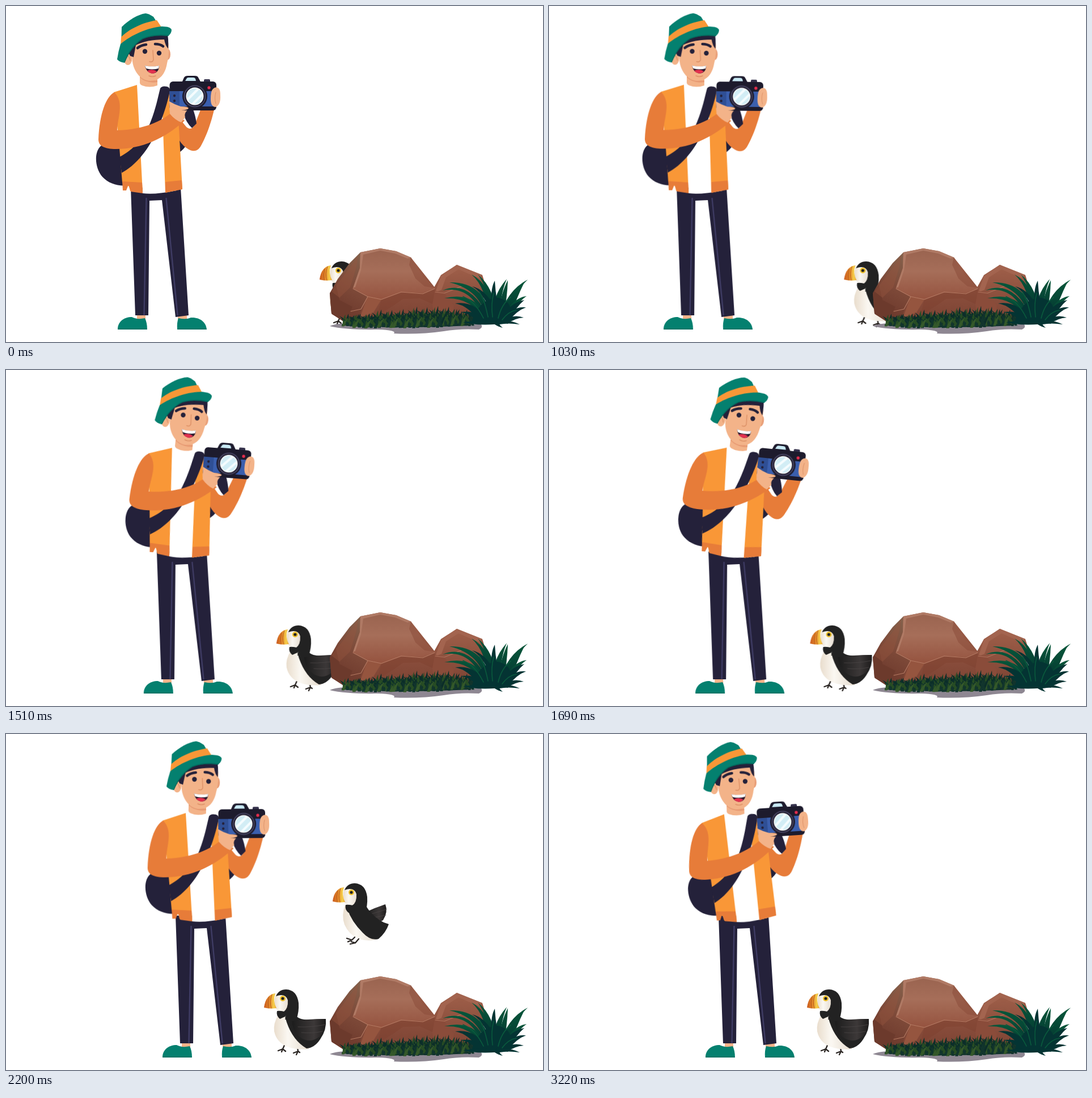
These frames come from a looping animation (947 by 592 pixels, 3720 ms). An HTML page without scripts:

```html
<!DOCTYPE html>
<html lang="en">
<head>
<meta charset="utf-8">
<title>Bird photographer</title>
<style>
html,body{margin:0;width:100%;height:100%;overflow:hidden;background:#fff}
svg{display:block;width:100vw;height:100vh}
.man,.torso,.head,.walker,.flyer{animation:3720ms infinite linear}
.man{animation-name:walk}
.torso{animation-name:lean;transform-origin:262px 328px}
.head{animation-name:nod;transform-origin:255px 132px}
.walker{animation-name:waddle}
.flyer{animation-name:fly}
@keyframes walk{
  0%{transform:translateX(0)}
  26.075%{transform:translateX(0);animation-timing-function:steps(31)}
  51.075%,100%{transform:translateX(79px)}
}
@keyframes lean{
  0%{transform:translateX(0) rotate(0deg)}
  26.075%{transform:translateX(0) rotate(0deg);animation-timing-function:steps(31)}
  51.075%{transform:translateX(2px) rotate(7.7deg);animation-timing-function:steps(14)}
  62.366%,100%{transform:translateX(11px) rotate(-3.7deg)}
}
@keyframes nod{
  0%{transform:rotate(0deg)}
  26.075%{transform:rotate(0deg);animation-timing-function:steps(31)}
  51.075%,100%{transform:rotate(2deg)}
}
@keyframes waddle{
  0%{transform:translateX(98px)}
  18.011%{transform:translateX(98px);animation-timing-function:steps(36)}
  47.043%,100%{transform:translateX(0)}
}
@keyframes fly{
  0%{transform:translate(62.7px,189.2px)}
  45.43%{transform:translate(62.7px,189.2px);animation-timing-function:steps(51)}
  86.559%,100%{transform:translate(-122.4px,-378.4px)}
}
.navy{fill:#24213a}
.teal{fill:#04806f}
.light{fill:#f99737}
.dark{fill:#e77c39}
.skin{fill:#f3b389}
.black{fill:#222}
.line{fill:none;stroke-linecap:round;stroke-linejoin:round}
</style>
</head>
<body>
<svg viewBox="0 0 947 592" preserveAspectRatio="none">
<defs>
  <linearGradient id="top" x1="0" y1="0" x2="0" y2="1"><stop offset="0" stop-color="#99634f"/><stop offset=".45" stop-color="#a66e59"/><stop offset="1" stop-color="#95533f"/></linearGradient>
  <linearGradient id="side" x1=".6" y1="0" x2=".3" y2="1"><stop offset="0" stop-color="#84604b"/><stop offset=".45" stop-color="#7e4a39"/><stop offset="1" stop-color="#693529"/></linearGradient>
  <linearGradient id="low" x1="0" y1="0" x2="0" y2="1"><stop offset="0" stop-color="#a0604a"/><stop offset="1" stop-color="#7a4132"/></linearGradient>
  <linearGradient id="beak"><stop offset="0" stop-color="#c9591d"/><stop offset=".5" stop-color="#e68f2c"/><stop offset=".78" stop-color="#f6d04b"/><stop offset="1" stop-color="#e8a23a"/></linearGradient>
  <linearGradient id="belly"><stop offset="0" stop-color="#e9ddcd"/><stop offset=".4" stop-color="#fbf8f2"/><stop offset="1" stop-color="#e6dccf"/></linearGradient>
  <linearGradient id="wing"><stop offset="0" stop-color="#1c1c1c"/><stop offset=".65" stop-color="#3c3838"/><stop offset="1" stop-color="#1d1b1b"/></linearGradient>
  <linearGradient id="leaf" x1="0" y1="0" x2="0" y2="1"><stop offset="0" stop-color="#07573a"/><stop offset="1" stop-color="#04302f"/></linearGradient>

  <g id="bhead">
    <path fill="url(#belly)" d="M477 458Q490 455 496 463Q501 476 494 486Q490 491 481 488Q475 485 474 478Q472 465 477 458Z"/>
    <path class="black" d="M476 462Q481 450 494 450Q513 451 516 474Q517 490 512 503L492 503Q496 494 489 490Q498 484 497 469Q493 456 476 462Z"/>
    <path class="black" d="M478 488Q488 487 498 492L492 498L483 502Q476 496 478 488Z"/>
    <path fill="url(#beak)" d="M475 457Q458 459 455 482Q465 485 477 483Q470 470 475 457Z"/>
    <path class="line" stroke="#a94b18" stroke-width=".8" d="M464 463Q461 473 463 483M469 459Q464 472 468 483"/>
    <circle cx="488" cy="466" r="5" fill="#f0c22c"/><circle cx="488" cy="466" r="2.6" fill="#222"/>
  </g>

  <path id="b1" d="M-2 0Q-3-13-10-21Q2-14 3 0Z"/>
  <path id="b2" d="M-2 0Q-2-16 3-27Q4-13 3 0Z"/>
  <path id="b3" d="M-2 0Q1-13 10-22Q6-9 3 0Z"/>
  <g id="tuft">
    <g fill="#0c2e29"><use href="#b1" x="-7"/><use href="#b3" x="1"/><use href="#b1" x="9"/><use href="#b2" x="-3"/><use href="#b3" x="10"/></g>
    <g fill="#274c24"><use href="#b2" x="-9" y="2"/><use href="#b1" x="3" y="3"/><use href="#b3" x="-6" y="4"/></g>
    <g fill="#12352d"><use href="#b2" x="7" y="4"/><use href="#b1" x="-2" y="6"/><use href="#b3" x="4" y="7"/><use href="#b1" x="11" y="6"/></g>
    <g fill="#34582a"><use href="#b3" x="-11" y="7"/></g>
  </g>
  <g id="row"><use href="#tuft" x="0"/><use href="#tuft" x="19" y="1"/><use href="#tuft" x="39" y="-1"/><use href="#tuft" x="59"/></g>
  <clipPath id="glass"><circle cx="333" cy="159" r="14.5"/></clipPath>
</defs>

<!-- birds -->
<g class="flyer">
  <path fill="url(#wing)" d="M633 314Q650 306 668 300Q673 313 664 328Q655 334 645 330Z"/>
  <path class="line" stroke="#4b4646" stroke-width=".8" d="M640 318L670 309M645 324L669 319"/>
  <path fill="url(#belly)" d="M597 301Q590 320 596 336Q604 354 621 361Q637 366 652 362Q625 340 611 301Z"/>
  <path class="black" d="M601 299L632 296Q634 306 643 315Q657 331 674 335Q669 350 656 361Q642 365 628 350Q608 330 601 308Z"/>
  <use href="#bhead" x="120" y="-187"/>
  <path class="line" stroke="#2a2522" stroke-width="2.3" d="M614 358L609 363L600 360M609 363L602 366M621 361L615 368L606 370M615 368L608 366"/>
</g>
<g class="walker">
  <path class="line" stroke="#2a2522" stroke-width="2.3" d="M493 544L488 555L480 558M488 555L486 560M488 555L493 559M513 545L515 559L507 562M515 559L512 565M515 559L518 561"/>
  <path fill="url(#belly)" d="M480 495Q471 510 473 524Q477 543 496 551Q514 557 534 555L530 520L497 494Z"/>
  <path class="black" d="M492 498L513 498Q520 505 540 503L564 502Q566 521 554 538Q544 553 530 554Q506 540 495 508Z"/>
  <path fill="url(#wing)" d="M504 506Q532 502 564 502Q565 518 554 532Q538 546 521 536Q506 526 504 506Z"/>
  <path class="line" stroke="#4b4646" stroke-width=".8" d="M515 516Q538 517 563 512M521 526Q540 528 558 524"/>
  <use href="#bhead"/>
</g>

<!-- rocks -->
<path fill="#8e8792" d="M571 564Q584 558 620 559L838 561Q842 566 834 570Q800 568 772 573Q730 579 684 577Q690 571 655 570Q600 571 571 564Z"/>
<path fill="url(#low)" d="M752 501L767 474L795 456L840 474L848 500L822 560H750Z"/>
<path fill="#a3644f" d="M767 476L795 456L840 474L833 479L798 464L776 478L768 500L757 505Z"/>
<path fill="#8a4c3a" d="M752 501L772 505L790 528L786 560H748Z"/>
<path class="line" stroke="#b0725c" stroke-width="1.2" d="M757 504L773 506L808 492"/>
<path fill="url(#low)" d="M625 434L714 443L757 497L752 525L758 562L600 558L575 543Z"/>
<path fill="url(#side)" d="M625 434L606 453L585 481L571 506L574 542L597 557L622 548L637 512L612 497L624 462Z"/>
<path fill="#6c3a2c" d="M571 506L582 492L588 518L611 530L597 557L574 542Z"/>
<path fill="#96553f" d="M574 503L604 464L621 440L618 460L607 496L588 514Z" opacity=".4"/>
<path fill="url(#top)" d="M625 434L660 427L688 432L714 443L734 476L757 497L735 506L697 504L662 517L638 511L612 497L624 462Z"/>
<path fill="#b07a65" d="M625 434L660 427L688 432L714 443L708 445L686 436L660 431L630 438L626 466L616 495L612 497L624 462Z"/>
<path fill="#8a4b39" d="M714 443L734 476L757 497L738 494L722 480L711 456Z" opacity=".5"/>
<path fill="#95553f" d="M638 511L662 517L648 540L624 550Z"/>
<path fill="#7b3c2d" d="M662 517L697 504L735 506L757 497L752 525L730 515L700 516L680 530L655 545Z" opacity=".35"/>
<path class="line" stroke="#b57a63" stroke-width="1.1" d="M612 498L638 512L662 517L697 504L735 507L756 498M638 512L626 534L608 538"/>

<!-- grass -->
<path fill="#102f2a" d="M592 561Q620 548 660 548L740 542L815 547L818 563Q700 569 592 563Z"/>
<use href="#row" transform="translate(604 560) scale(.95 .66)"/>
<use href="#row" transform="translate(662 559) scale(1 .9)"/>
<use href="#row" transform="translate(725 557) scale(.95 1.02)"/>
<use href="#row" transform="translate(760 558) scale(.9 .86)"/>
<use href="#row" transform="translate(625 562) scale(1.1 .74)"/>
<use href="#row" transform="translate(694 561) scale(1.05 .84)"/>

<!-- bush -->
<g fill="url(#leaf)">
  <path d="M842 552Q822 492 770 501Q818 481 852 550Z"/>
  <path d="M838 554Q825 513 773 515Q828 501 850 553Z"/>
  <path d="M846 552Q838 500 782 487Q842 485 857 550Z"/>
  <path d="M850 550Q848 497 821 473Q856 491 861 550Z"/>
  <path d="M855 550Q851 497 832 473Q862 497 866 550Z"/>
  <path d="M862 550Q854 514 883 481Q869 516 873 550Z"/>
  <path d="M866 550Q873 505 885 483Q884 514 877 550Z"/>
  <path d="M870 551Q882 502 920 482Q893 508 883 553Z"/>
  <path d="M876 552Q884 509 914 487Q899 517 887 554Z"/>
  <path d="M874 555Q890 515 918 511Q898 525 886 557Z"/>
</g>
<g fill="#043433">
  <path d="M820 560Q835 514 868 514Q900 522 886 558Q850 564 820 560Z"/>
  <path d="M834 556Q816 528 792 524Q826 518 850 554Z"/>
  <path d="M832 558Q818 540 801 540Q828 533 846 557Z"/>
  <path d="M846 520Q834 500 822 494Q843 499 856 522Z"/>
  <path d="M856 520Q855 496 862 484Q863 502 866 520Z"/>
  <path d="M880 540Q894 522 914 518Q900 530 888 552Z"/>
  <path d="M878 550Q896 528 917 531Q900 537 886 556Z"/>
  <path d="M876 554Q896 542 913 549Q897 550 884 560Z"/>
  <path d="M870 555Q890 553 906 561Q886 558 870 561Z"/>
  <path d="M845 555Q823 553 806 558Q825 561 848 561Z"/>
  <path d="M860 556Q858 562 876 567Q868 561 869 554Z"/>
</g>
<g class="line" stroke="#0a5a3d" stroke-width="1.6">
  <path d="M842 550Q828 521 806 512M850 548Q844 518 835 504M858 548Q855 524 860 506M868 550Q874 525 890 513M875 553Q886 538 900 536"/>
</g>

<!-- photographer -->
<g class="man">
  <path class="skin" d="M231 541H246V552H231ZM303 541H319V552H303Z"/>
  <path class="teal" d="M197 570C197 556 208 548 222 548Q231 553 245 550Q249 558 249 570ZM302 570Q301 558 304 550Q318 553 326 549C342 548 353 557 354 570Z"/>
  <path class="line" stroke="#046d60" stroke-width="1.2" d="M198 569.4H248M303 569.4H353"/>
  <path class="navy" d="M220 320H308L322 545L299 548L275 342L253 343L251 545H228Z"/>
  <path class="line" stroke="#3f3c64" stroke-width="2.4" d="M247.500 339L243.500 544M282.500 339L302.500 544"/>

  <g class="torso">
    <path class="navy" d="M168 246C155 256 156 285 170 301C181 313 198 318 215 316V244ZM304 230L319 243Q314 253 304 259Z"/>
    <path class="dark" d="M368 178C362 207 352 232 344 246C338 257 329 258 318 250C311 245 306 238 302 230L304 196L318 213C326 220 331 214 334 206L345 178Z"/>
    <path class="navy" d="M313 180H329Q334 192 336 207L328 215Q318 206 313 190Z"/>
    <path fill="#fff" d="M231 138L240 136Q252 144 267 140L285 142L298 200L301 325Q262 333 241 330Z"/>
    <path class="light" d="M231 139L190 152L200 250L205 311L217 318L219 326L241 329ZM278 150L290 146L304 198L311 322L281 329L276 190Z"/>
    <path class="dark" d="M205 309L240 311L241 330L220 327L216 315L212 325H206ZM281 310L310 307L311 323L281 329Z"/>
    <path class="navy" d="M272 145Q275 140 284 142Q290 144 289 150C281 188 262 238 240 263C228 278 215 288 204 294L200 266C224 254 244 232 255 204C264 182 268 160 272 145Z"/>
    <path class="dark" d="M191 152C176 160 165 190 163 235C163 246 172 251 190 252C238 253 279 234 315 202L293 187C268 208 235 218 196 219C197 196 209 170 191 152Z"/>

    <g class="head">
      <path class="skin" d="M236 100V133Q235 138 240 140Q253 145 267 140V115Z"/>
      <path fill="#e79a73" d="M236 119Q247 133 267 131V134Q248 137 236 126Z"/>
      <ellipse class="skin" cx="215" cy="92" rx="7.500" ry="12"/>
      <path class="line" stroke="#dd9268" stroke-width="1.300" d="M211 87Q218 87 219 96"/>
      <ellipse cx="285" cy="85" rx="5" ry="10" fill="#e99f78"/>
      <path class="skin" d="M221 70L223 98C226 118 239 131 254 132C271 132 281 120 284 101C288 85 288 68 284 54L230 58Z"/>
      <path class="navy" d="M214 78L222 58Q258 36 284 44Q287 58 286 75Q281 70 279 59Q248 59 229 69L225 90L219 88Z"/>
      <path class="line" stroke="#24213a" stroke-width="4.600" d="M232 74Q238 69 247 68M263 67Q272 67 277 71"/>
      <circle class="navy" cx="245" cy="80" r="4.200"/><circle class="navy" cx="270" cy="83" r="4.200"/>
      <path class="line" stroke="#dd9268" stroke-width="1.500" d="M259 78L260 95Q258 100 253 98M252 123Q258 126 264 123"/>
      <path fill="#2a1a2c" d="M245 105Q258 109 270 105Q270 118 258 119Q247 117 245 105Z"/>
      <path fill="#fff" d="M245 105Q258 108 270 105L269 110Q258 113 247 110Z"/>
      <path fill="#e2314f" d="M249 114Q258 110 266 115Q262 119 258 119Q252 118 249 114Z"/>
      <path class="teal" d="M204 37C216 25 232 15 246 13Q251 13 260 19L273 40L203 73Z"/>
      <path class="light" d="M203 55C215 42 240 29 266 25L274 37C248 41 220 56 202 70Z"/>
      <path class="teal" d="M202 67C221 51 250 38 275 36Q290 36 292 42Q292 48 286 53Q262 50 241 58Q220 71 209 100Q200 99 196 94Q198 80 202 67Z"/>
      <path class="line" stroke="#03695d" stroke-width="1.500" d="M286 52Q262 49 241 57.500Q220 71 209 99"/>
    </g>

    <!-- camera -->
    <path class="skin" d="M287 163L289 190Q298 201 309 205L316 196Q313 187 325 180L318 174Z"/>
    <path fill="#1d1b2d" d="M310 135L314 126Q316 123 320 123L333 123Q338 123 339 126L344 135Z"/>
    <path fill="#c8e9f4" d="M316 132L319 127Q320 126 322 126H330Q333 126 334 128L335 132Z"/>
    <rect x="349" y="129" width="11" height="6" rx="2" fill="#35324c"/>
    <rect x="288.500" y="133" width="82.500" height="51" rx="6" fill="#1d1b2d"/>
    <path fill="#3b5fae" d="M288.500 150H370V177H288.500Z"/>
    <path fill="#2f4f95" d="M288.500 150H306V177H288.500Z"/>
    <circle cx="358" cy="144" r="2.700" fill="#e62c4c"/>
    <circle class="navy" cx="297" cy="158" r="2.200"/><circle class="navy" cx="297" cy="167" r="2.200"/>
    <circle cx="333" cy="159" r="22" fill="#1d1b2d"/>
    <circle cx="333" cy="159" r="18.500" fill="none" stroke="#45425f" stroke-width="2"/>
    <circle cx="333" cy="159" r="15.500" fill="#fff"/>
    <circle cx="333" cy="159" r="14" fill="#d2edf5"/>
    <path class="line" clip-path="url(#glass)" stroke="#f5fcfe" stroke-width="4" d="M320 165L340 145M329 173L350 152"/>
    <path class="skin" d="M288 168Q298 174 308 177Q321 177 322 180Q321 183 309 184L289 186Z"/>
    <path class="skin" d="M365 146Q370 141 375 145Q378 148 378 157Q379 174 370 178Q361 178 361 164Q361 150 365 146Z"/>
    <path class="line" stroke="#dd9268" stroke-width="1" d="M370 152Q367 162 370 172"/>
  </g>
</g>
</svg>
</body>
</html>
```
